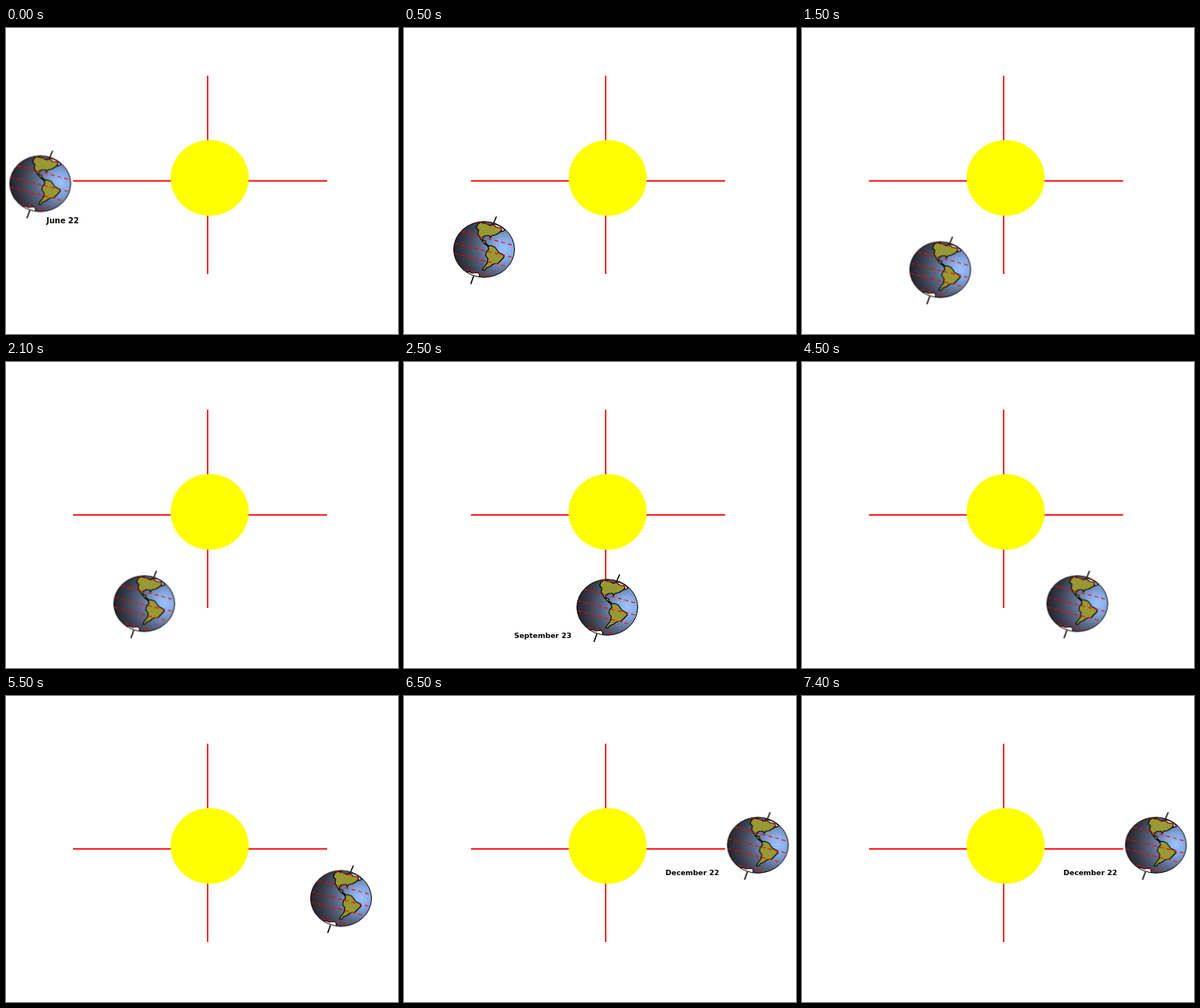
Animation of 509x398 px, one loop 8000 ms. Source, as an HTML page:

```html
<!DOCTYPE html>
<html lang="en">
<head>
<meta charset="utf-8">
<title>Earth and Sun</title>
<style>
  html, body { margin: 0; width: 100%; height: 100%; overflow: hidden; background: #fff; }
  svg { display: block; width: 100vw; height: 100vh; }
  text { font: bold 9.4px "DejaVu Sans", Verdana, sans-serif; visibility: hidden; }
  .axes { stroke: #f00; stroke-width: 1.7; }
  .land { fill: #999933; stroke: #000; stroke-width: 1.2; stroke-linejoin: round; }
  .ice { fill: #fff; stroke: #000; stroke-width: 1.1; }
  .parallels { fill: none; stroke: #f00; stroke-width: 1.2; stroke-dasharray: 5 4; }
  .pole { fill: none; stroke: #000; stroke-width: 1.6; }
</style>
</head>
<body>
<svg viewBox="0 0 509 398">
  <defs>
    <radialGradient id="ocean" gradientUnits="userSpaceOnUse" cx="26" cy="-1" r="66">
      <stop offset="0" stop-color="#9cc4ff"/>
      <stop offset=".2" stop-color="#86a9e2"/>
      <stop offset=".48" stop-color="#5c6a88"/>
      <stop offset=".78" stop-color="#383b48"/>
      <stop offset="1" stop-color="#22222a"/>
    </radialGradient>
    <clipPath id="disc"><ellipse rx="39.5" ry="36.3"/></clipPath>
  </defs>

  <path class="axes" d="M261.8 62V320M87 198.8H417"/>
  <ellipse cx="264.4" cy="195" rx="50.7" ry="49.2" fill="#ff0"/>

  <g id="earth">
    <path class="pole" d="M12.5-34.5L16-42.8M-13.5 34.5L-17.3 45"/>
    <ellipse rx="39.5" ry="36.3" fill="url(#ocean)"/>
    <g clip-path="url(#disc)">
      <path class="ice" d="M10-33Q18-33 24-28L27-25L23-23L20-27L14-27L9-30Z"/>
      <path class="ice" d="M-25 30L-20 29L-15 31L-8 30L-6 33L-7 38H-20Z"/>
      <path class="land" d="M-8-33L-4-35L4-33L8-31L12-32L16-29L22-28L23-25L20-22L15-19L10-18L8-15L7-18L2-18L-2-16L-2-12L2-11L2-8L6-5L5-4L0-8L-4-13L-6-17L-8-20L-7-25L-10-28Z"/>
      <path class="land" d="M5-4L9-5L14-3L17 1L19 4L25 7L26 10L22 14L18 18L12 19L8 22L3 24L1 27L-2 27L0 23L4 18L5 12L2 8L3 3L6 0Z"/>
      <path class="parallels" d="M-8-35Q12-33 27-25M-30-23.5Q6-14 39-5M-39-8.5Q0 1.5 38 10.5M-39 4.5Q-2 14 33 23M-25 26Q-8 32 14 35"/>
    </g>
    <ellipse rx="39.5" ry="36.3" fill="none" stroke="#000"/>
  </g>

  <text id="june" x="52.5" y="254" style="font-size:10px">June 22</text>
  <text id="september" x="143" y="359">September 23</text>
  <text id="december" x="339.5" y="232.5">December 22</text>
</svg>
<script>
  const LOOP = 8000;
  // start time, earth centre, label
  const steps = [
    [0, 44.5, 202.5, "june"],
    [500, 104, 288],
    [1500, 179.5, 314.3],
    [2500, 264, 319, "september"],
    [4500, 357.5, 314.3],
    [5500, 435, 263.3],
    [6500, 459.5, 194, "december"]
  ];

  function hold(id, style) {
    const frames = steps.map(step => ({
      ...style(step), offset: step[0] / LOOP, easing: "step-end"
    }));
    frames.push({ ...style(steps.at(-1)), offset: 1 });
    document.getElementById(id).animate(frames, { duration: LOOP, iterations: Infinity })
      .startTime = 0;
  }

  function start() {
    hold("earth", ([, x, y]) => ({ transform: `translate(${x}px, ${y}px)` }));
    for (const id of ["june", "september", "december"])
      hold(id, step => ({ visibility: step[3] === id ? "visible" : "hidden" }));
  }
  start();
</script>
</body>
</html>
```
